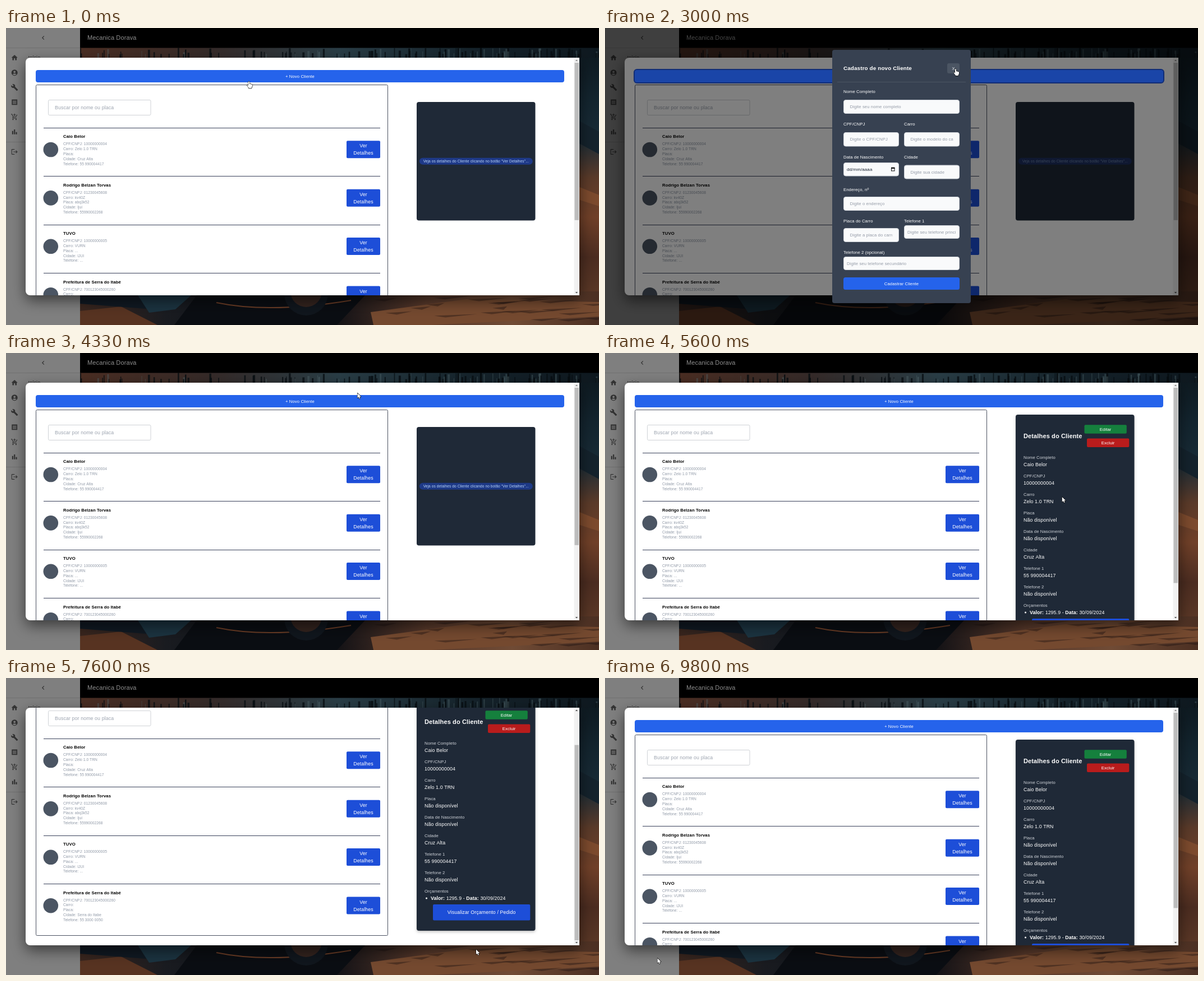
An HTML page with a canvas for the animation above (9870 ms loop, 1057 by 530 pixels).

```html
<!DOCTYPE html>
<html lang="pt-BR">
<head>
<meta charset="utf-8">
<title>Clientes</title>
<style>
html, body { margin: 0; width: 100%; height: 100%; overflow: hidden; background: #000; }
canvas { display: block; width: 1057px; height: 530px; }
</style>
</head>
<body>
<canvas id="stage"></canvas>
<script>
const W = 1057, H = 530, LOOP = 9870, FPS = 15;
const FONT = '"Liberation Sans", Arial, sans-serif';
const canvas = document.getElementById('stage');
const dpr = window.devicePixelRatio || 1;
canvas.width = W * dpr;
canvas.height = H * dpr;
const ctx = canvas.getContext('2d');

const clients = [
  ['Caio Belor', '10000000004', 'Zelo 1.0 TRN', '', 'Cruz Alta', '55 990004417'],
  ['Rodrigo Belzan Torvas', '01230045608', 'kv40Z', 'abq3k52', 'Ijui', '55990002268'],
  ['TUVO', '10000000005', 'VURN', '...', 'IJUI', '...'],
  ['Prefeitura de Serra do Itabé', '700123045000260', '', '', 'Serra do Itabe', '55 3000 0050']
];
const fields = ['CPF/CNPJ', 'Carro', 'Placa', 'Cidade', 'Telefone'];
const none = 'Não disponível';
const details = [
  ['Nome Completo', clients[0][0]], ['CPF/CNPJ', clients[0][1]], ['Carro', clients[0][2]],
  ['Placa', none], ['Data de Nascimento', none], ['Cidade', clients[0][4]],
  ['Telefone 1', clients[0][5]], ['Telefone 2', none]
];
// label, x, label y, input y, width, height, placeholder, padding
const inputs = [
  ['Nome Completo', 425, 113.5, 128, 207, 25, 'Digite seu nome completo', 11.5],
  ['CPF/CNPJ', 425, 171.5, 186, 99, 25.5, 'Digite o CPF/CNPJ', 11.5],
  ['Carro', 533, 171.5, 186, 99, 25.5, 'Digite o modelo do carro', 11.5],
  ['Data de Nascimento', 425, 230, 240, 99, 24.5, '', 6],
  ['Cidade', 533, 230, 244.5, 99, 25, 'Digite sua cidade', 11.5],
  ['Endereço, nº', 425, 288, 301, 207, 25, 'Digite o endereço', 11.5],
  ['Placa do Carro', 425, 344.5, 357, 99, 25, 'Digite a placa do carro', 11.5],
  ['Telefone 1', 533, 344.5, 352, 99, 24, 'Digite seu telefone principal', 6],
  ['Telefone 2 (opcional)', 425, 400.5, 408, 207, 24, 'Digite seu telefone secundário', 6]
];
const icons = [
  [53, 'M10 20v-6h4v6h5v-8h3L12 3 2 12h3v8z'],
  [79.7, 'M2 12a10 10 0 1 0 20 0a10 10 0 1 0-20 0zM8.5 9.5a3.5 3.5 0 1 1 7 0a3.5 3.5 0 1 1-7 0zM5.8 17.2Q12 12.8 18.2 17.2Q12 23 5.8 17.2z'],
  [106, 'M22.7 19l-9.1-9.1c.9-2.3.4-5-1.5-6.9-2-2-5-2.4-7.4-1.3L9 6 6 9 1.6 4.7C.4 7.1.9 10.1 2.9 12.1c1.9 1.9 4.6 2.4 6.9 1.5l9.1 9.1c.4.4 1 .4 1.4 0l2.3-2.3c.5-.4.5-1.1.1-1.4z'],
  [132.4, 'M3 3h18v18H3zM6 7h12v2H6zM6 11h12v2H6zM6 15h12v2H6z'],
  [158.8, 'M11 9h2V6h3V4h-3V1h-2v3H8v2h3zM5 20a2 2 0 1 0 4 0a2 2 0 1 0-4 0zM15 20a2 2 0 1 0 4 0a2 2 0 1 0-4 0zM8.1 13h7.5l1.7-1 4-7-1.8-1-3.9 7h-7L4.3 2H1v2h2l3.6 7.6L5 15q0 2 2 2h12v-2H7.2z'],
  [185.3, 'M4 9h4v11H4zM10 4h4v16h-4zM16 13h4v7h-4z'],
  [221, 'M17 7l-1.4 1.4 2.6 2.6H8v2h10.2l-2.6 2.6L17 17l5-5zM4 5h8V3H4Q2 3 2 5v14q0 2 2 2h8v-2H4z']
].map(([y, d]) => [y, new Path2D(d)]);
const arrow = new Path2D('M0 0V16L3.8 12.6 6.4 18.4 9 17.3 6.5 11.6H11.6z');
const hand = new Path2D('M-1.8 1.5Q0-1.5 1.8 1.5V8Q3.6 6.5 5 8.5Q7 7.5 8 9.5Q11 8.5 11 12Q11.5 17 8.5 20V22H-.5V20Q-4 16-6.2 12.6Q-6-9.4-3.6 11.4L-1.8 13z'.replace('Q-6-9.4-3.6 11.4', 'Q-5.6 10-3.6 11.6'));

const path = [
  [0, 433, 95.5], [67, 433, 95.5], [600, 482, 88], [2030, 482, 88], [2700, 625, 73],
  [3500, 625, 73], [3700, 626.5, 71.5], [4400, 626.5, 71.5], [4930, 640, 217],
  [5230, 640, 217], [5730, 850, 265], [6250, 850, 265], [6660, 845, 485],
  [7230, 845, 485], [7500, 840, 507], [8060, 816, 240.5], [8200, 767, 249],
  [8860, 110, 536], [9700, 55, 536], [9733, 59, 517], [9790, 93.5, 500], [LOOP, 93.5, 500]
];
const BUSY = 1700, OPEN = 1930, CLOSE = 4200, SHOW = 5060;

const clamp = v => Math.max(0, Math.min(1, v));
const smooth = v => v * v * (3 - 2 * v);
const inOut = v => v < .5 ? 2 * v * v : 1 - 2 * (1 - v) ** 2;

function cursorAt(t) {
  const i = Math.max(1, path.findIndex(k => k[0] > t));
  const [a, b] = [path[i - 1], path[i]];
  const p = smooth(clamp((t - a[0]) / (b[0] - a[0])));
  return [a[1] + (b[1] - a[1]) * p, a[2] + (b[2] - a[2]) * p];
}

function scrollAt(t) {
  return 70 * (inOut(clamp((t - 5920) / 250)) - inOut(clamp((t - 7890) / 250)));
}

function rect(x, y, w, h, color) {
  ctx.fillStyle = color;
  ctx.fillRect(x, y, w, h);
}

function box(x, y, w, h, r, fill, stroke, line = 1) {
  ctx.beginPath();
  ctx.roundRect(x, y, w, h, r);
  if (fill) { ctx.fillStyle = fill; ctx.fill(); }
  if (stroke) { ctx.strokeStyle = stroke; ctx.lineWidth = line; ctx.stroke(); }
}

function poly(color, ...p) {
  ctx.beginPath();
  for (let i = 0; i < p.length; i += 2) ctx.lineTo(p[i], p[i + 1]);
  ctx.fillStyle = color;
  ctx.fill();
}

function disc(x, y, r, color) {
  ctx.beginPath();
  ctx.arc(x, y, r, 0, 7);
  ctx.fillStyle = color;
  ctx.fill();
}

// y is the middle of the line
function text(s, x, y, size, color, bold = false, align = 'left') {
  ctx.font = `${bold ? 'bold ' : ''}${size}px ${FONT}`;
  ctx.letterSpacing = size * .012 + 'px';
  ctx.textAlign = align;
  ctx.fillStyle = color;
  ctx.fillText(s, x, y + size * .35);
}

function button(x, y, w, h, r, color, label, size) {
  box(x, y, w, h, r, color);
  text(label, x + w / 2, y + h / 2, size, '#fff', false, 'center');
}

function clipped(x, y, w, h, r, draw) {
  ctx.save();
  ctx.beginPath();
  ctx.roundRect(x, y, w, h, r);
  ctx.clip();
  draw();
  ctx.restore();
}

function gradient(x0, y0, x1, y1, ...colors) {
  const g = ctx.createLinearGradient(x0, y0, x1, y1);
  colors.forEach((c, i) => g.addColorStop(i / (colors.length - 1), c));
  return g;
}

function scenery() {
  let seed = 7;
  const rnd = () => (seed = seed * 16807 % 2147483647) / 2147483647;
  rect(132, 35, 925, 495, '#0b1117');
  rect(132, 35, 925, 18, gradient(132, 0, W, 0, '#4a2d22', '#352a28', '#293d46', '#15232b', '#0e181f'));
  for (let i = 0; i < 130; i++) {
    const x = 132 + rnd() * 925, h = 6 + rnd() * 12;
    rect(x, 53 - h, 1 + rnd() * 3, h, rnd() < .7 ? 'rgba(6,12,17,.75)' : 'rgba(82,104,109,.4)');
  }
  rect(1020, 53, 37, 430, gradient(0, 53, 0, 480, '#0e1a21', '#13242e', '#182b36', '#5a3a29', '#704028', '#4b2c20', '#5b3826'));
  poly('#14222c', 1020, 165, W, 185, W, 225, 1020, 205);
  poly('#7c4a2d', 1020, 283, W, 298, W, 318, 1020, 306);

  rect(132, 470, 925, 60, gradient(132, 0, W, 0, '#3a261e', '#191b20', '#0d1117', '#151316', '#57382a', '#704b35', '#4b2f22'));
  poly('#573321', 132, 505, 205, 497, 270, 530, 132, 530);
  poly('#101922', 132, 477, 330, 477, 275, 503, 132, 492);
  poly('#1b3340', 235, 477, 330, 477, 302, 502, 255, 508);
  poly('#0a0d12', 340, 477, 640, 477, 590, 530, 300, 530);
  ctx.strokeStyle = '#6a3c25';
  ctx.lineWidth = 2;
  ctx.beginPath();
  ctx.moveTo(375, 490);
  ctx.quadraticCurveTo(470, 510, 615, 486);
  ctx.stroke();
  disc(535, 474, 39, '#10161d');
  disc(535, 470, 28, '#33231e');
  poly('#74492f', 650, 507, 820, 484, W, 489, W, 515, 760, 530, 655, 530);
  for (let i = 0; i < 22; i++) {
    const x = 640 + rnd() * 400, y = 480 + rnd() * 45;
    poly('rgba(25,16,15,.4)', x, y, x + 25 + rnd() * 55, y - 3, x + 20, y + 3);
  }
}

function shell() {
  scenery();
  rect(0, 0, W, 35.5, '#000');
  text('Mecanica Dorava', 145, 17.5, 11, '#8d8d8d');
  rect(0, 0, 132, H, '#7f7f7f');
  rect(0, 35, 132, 1, '#707070');
  rect(0, 203, 132, 1, '#707070');
  ctx.strokeStyle = '#333';
  ctx.lineWidth = 1.2;
  ctx.beginPath();
  ctx.moveTo(67.8, 14.4);
  ctx.lineTo(64.7, 17.5);
  ctx.lineTo(67.8, 20.6);
  ctx.stroke();
  for (const [y, icon] of icons) {
    ctx.save();
    ctx.translate(8.6, y - 6.6);
    ctx.scale(.55, .55);
    ctx.fillStyle = '#333';
    ctx.fill(icon, 'evenodd');
    ctx.restore();
  }
  text('Início', 39.5, 53, 8.8, '#222');
  ctx.save();
  ctx.shadowColor = 'rgba(0,0,0,.55)';
  ctx.shadowBlur = 26 * dpr;
  ctx.shadowOffsetY = 9 * dpr;
  box(35, 53, 987, 424, [8, 0, 0, 8], '#fff');
  ctx.restore();
}

function clientRow(c, i, hover) {
  const y = 178 + i * 86.4;
  rect(67, Math.round(y), 600, 1, '#38405a');
  disc(79.8, y + 39, 13.3, '#4b5563');
  text(c[0], 102, y + 15.7, 7.7, '#000', true);
  fields.forEach((f, k) => text(`${f}: ${c[k + 1]}`, 102, y + 29 + k * 8.8, 6.6, '#8f98a6'));
  box(607, y + 23.3, 60, 31, 2, hover ? '#1e40af' : '#1d4ed8');
  text('Ver', 637, y + 32.3, 8.8, '#fff', false, 'center');
  text('Detalhes', 637, y + 45.3, 8.8, '#fff', false, 'center');
}

function detailCard(hover) {
  ctx.save();
  ctx.shadowColor = 'rgba(0,0,0,.25)';
  ctx.shadowBlur = 5 * dpr;
  ctx.shadowOffsetY = 2 * dpr;
  box(732, 110, 211.5, 411, 4, '#1f2937');
  ctx.restore();
  text('Detalhes do Cliente', 746, 148, 11, '#fff', true);
  button(854.5, 128.3, 75.3, 15.4, 2, '#15803d', 'Editar', 7.7);
  button(859, 152.5, 75.3, 15.4, 2, '#b91c1c', 'Excluir', 7.7);
  details.forEach(([label, value], i) => {
    text(label, 746, 186.8 + i * 33, 7.7, '#d1d5db');
    text(value, 746, 198.5 + i * 33, 8.8, '#fff');
  });
  text('Orçamentos', 746, 450.8, 7.7, '#d1d5db');
  disc(749.5, 463, 1.5, '#fff');
  let x = 757;
  ['Valor:', ' 1295.9 - ', 'Data:', ' 30/09/2024'].forEach((s, i) => {
    text(s, x, 462.6, 8.8, '#fff', i % 2 === 0);
    x += ctx.measureText(s).width;
  });
  button(761, 474, 173.3, 28.5, 2, hover ? '#1e40af' : '#1d4ed8', 'Visualizar Orçamento / Pedido', 8.8);
}

function emptyCard(t) {
  box(732, 132, 211.5, 211.5, 4, '#1f2937');
  ctx.globalAlpha = .75 + .25 * Math.cos((t - 150) / 1000 * Math.PI);
  box(736.8, 231.8, 202, 12, 6, '#1e3a8a');
  text('Veja os detalhes do Cliente clicando no botão "Ver Detalhes"...', 837.8, 237.8, 6.6, '#bfdbfe', false, 'center');
  ctx.globalAlpha = 1;
}

function newButton(fill, ring) {
  if (ring) box(52, 74, 944, 24, 5, fill, ring, 2);
  else box(53, 75, 942, 22, 4, fill);
}

function scrollbar(scroll, full) {
  rect(1012.5, 53, 9.5, 424, '#f1f1f1');
  const track = 406, top = 62 + scroll / full * track;
  rect(1013.5, top, 7.5, track * 424 / full, '#bdbdbd');
  poly(scroll > 0 ? '#505050' : '#8a8a8a', 1014.8, 59, 1019.2, 59, 1017, 56.5);
  poly('#505050', 1014.8, 471, 1019.2, 471, 1017, 473.5);
}

function dialog(hoverX) {
  box(405, 39, 247, 452, 4, '#374151');
  text('Cadastro de novo Cliente', 425, 72, 9.9, '#fff', true);
  if (hoverX) box(610, 63, 22, 18, 3, '#4b5563');
  text('X', 621, 72, 7.7, '#e5e7eb', false, 'center');
  rect(414, 96, 229, 1, '#4b5563');
  for (const [label, x, ly, y, w, h, hint, pad] of inputs) {
    text(label, x, ly, 7.7, '#fff');
    box(x + .5, y + .5, w - 1, h - 1, 3.5, '#f9fafb', '#d1d5db');
    clipped(x + pad, y, w - 2 * pad, h, 0, () =>
      text(hint, x + pad, y + h / 2, 7.7, '#949ba7'));
  }
  text('dd/mm/aaaa', 431, 252, 8, '#1f2937');
  ctx.strokeStyle = '#111';
  ctx.lineWidth = 1;
  ctx.strokeRect(510.5, 249.5, 5.5, 5.5);
  rect(510, 249, 6.5, 2, '#111');
  rect(511.2, 248, 1, 1.5, '#111');
  rect(514.3, 248, 1, 1.5, '#111');
  button(425, 445, 207, 22, 3.5, '#2563eb', 'Cadastrar Cliente', 7.7);
}

function pointer(x, y, isHand) {
  ctx.save();
  ctx.translate(x, y);
  ctx.scale(.55, .55);
  const shape = isHand ? hand : arrow;
  ctx.lineJoin = 'round';
  ctx.lineWidth = 2;
  ctx.strokeStyle = '#000';
  ctx.stroke(shape);
  ctx.fillStyle = '#fff';
  ctx.fill(shape);
  ctx.restore();
}

function render(t) {
  const [cx, cy] = cursorAt(t);
  const open = t >= OPEN && t < CLOSE;
  const busy = t >= BUSY && t < OPEN;
  const shown = t >= SHOW;
  const scroll = scrollAt(t);
  const inside = (x, y, w, h) => cx >= x && cx < x + w && cy >= y && cy < y + h;
  const over = (x, y, w, h) => !open && inside(35, 53, 977, 424) && inside(x, y - scroll, w, h);
  const onNew = over(53, 75, 942, 22);
  const onRow = clients.map((c, i) => over(607, 201.3 + i * 86.4, 60, 31));
  const onView = shown && over(761, 474, 173, 28.5);
  const onX = open && inside(610, 63, 22, 18);

  ctx.setTransform(dpr, 0, 0, dpr, 0, 0);
  shell();
  clipped(35, 53, 987, 424, [8, 0, 0, 8], () => {
    ctx.save();
    ctx.translate(0, -scroll);
    if (busy) newButton('#4a71e0', '#3a61cb');
    else newButton(onNew && t > 60 ? '#1d4ed8' : '#2563eb');
    text('+ Novo Cliente', 524, 86, 7.7, '#fff', false, 'center');
    box(53.5, 101.5, 627, 428, 2, null, '#4a5060');
    box(75.5, 128.5, 182.5, 27, 2, '#fff', '#cfd2d6');
    text('Buscar por nome ou placa', 87, 142, 8.8, '#9ca3af');
    clients.forEach((c, i) => clientRow(c, i, onRow[i]));
    if (shown) detailCard(onView);
    else emptyCard(t);
    ctx.restore();
    scrollbar(scroll, shown ? 494 : 613);
  });
  if (open) {
    rect(0, 0, W, H, 'rgba(0,0,0,.5)');
    newButton('#1a45a8', '#122d74');
    dialog(onX);
  }
  const isHand = onX || onView || (onNew && !busy) || onRow.includes(true);
  pointer(cx, cy, isHand);
}

const start = performance.now();
function tick(now) {
  const t = Math.max(0, now - start) % LOOP;
  render(Math.floor(t * FPS / 1000 + .06) * 1000 / FPS);
  requestAnimationFrame(tick);
}
render(0);
requestAnimationFrame(tick);
</script>
</body>
</html>
```
